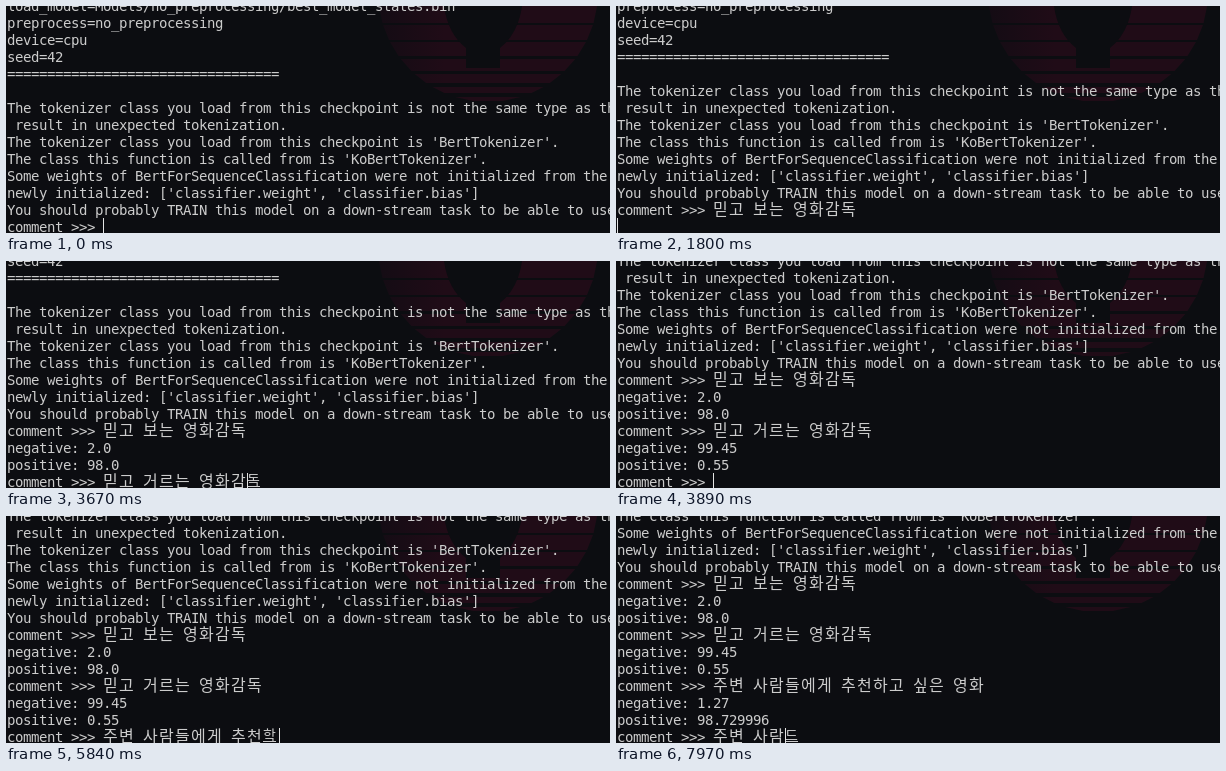
Animation, 604 px wide and 227 px high, one loop 8 s. Source, as an HTML page:

```html
<!DOCTYPE html>
<html lang="ko">
<head>
<meta charset="utf-8">
<title>Terminal session</title>
<style>
  html, body { margin: 0; width: 100%; height: 100%; overflow: hidden; background: #0c0d11; }
  svg { display: block; }
  text { font: 14px "DejaVu Sans Mono", "Noto Sans CJK KR", "Noto Sans CJK", monospace; fill: #cccccc; white-space: pre; }
  .wide { font: 16px "Noto Sans CJK KR", "Noto Sans CJK", sans-serif; }
  #preedit { font: 14px "Noto Sans CJK KR", "Noto Sans CJK", sans-serif; }
</style>
</head>
<body>
<svg width="604" height="227" viewBox="0 0 604 227">
  <defs>
    <linearGradient id="glow">
      <stop offset="0" stop-color="#140c14"/>
      <stop offset=".3" stop-color="#200c17"/>
      <stop offset="1" stop-color="#200c17"/>
    </linearGradient>
  </defs>
  <rect width="604" height="227" fill="#0c0d11"/>
  <path id="sun" fill="url(#glow)"/>
  <path d="M438 0h78q-4 28-22 42v20h-34v-20q-18-14-22-42z" fill="#0c0d11"/>
  <g id="rows"></g>
  <text id="preedit" y="224"></text>
  <rect id="underline" y="225" width="13" height="1" fill="#cccccc"/>
  <rect id="caret" y="212" width="1" height="15" fill="#e4e4e4"/>
</svg>
<script>
const LOOP = 8000, CELL = 8, LINE = 17, LEFT = 1, BASE = 226;
const PROMPT = 'comment >>> ';
const $ = id => document.getElementById(id);
const svgNode = (name, parent, attrs = {}) => {
  const node = document.createElementNS('http://www.w3.org/2000/svg', name);
  for (const key in attrs) node.setAttribute(key, attrs[key]);
  return parent.appendChild(node);
};

// Striped half sun behind the text
const SUN = { x: 482, y: -14, r: 110 };
const half = y => Math.sqrt(Math.max(0, SUN.r ** 2 - (y - SUN.y) ** 2));
$('sun').setAttribute('d', [[0, 17], [19, 15], [36, 14], [53, 12], [68, 9], [81, 6], [91, 4]].map(([y, h]) => {
  const a = half(y), b = half(y + h);
  return `M${SUN.x - a} ${y}H${SUN.x + a}L${SUN.x + b} ${y + h}H${SUN.x - b}Z`;
}).join(''));

// Hangul input: every key press gives one composing state
const LEADS = 'ㄱㄲㄴㄷㄸㄹㅁㅂㅃㅅㅆㅇㅈㅉㅊㅋㅌㅍㅎ';
const TAILS = ' ㄱㄲㄳㄴㄵㄶㄷㄹㄺㄻㄼㄽㄾㄿㅀㅁㅂㅄㅅㅆㅇㅈㅊㅋㅌㅍㅎ';
const syllable = (l, v, t) => String.fromCharCode(0xac00 + (l * 21 + v) * 28 + t);
const split = ch => {
  const n = ch.charCodeAt(0) - 0xac00;
  return [Math.floor(n / 588), Math.floor(n / 28) % 21, n % 28];
};

function keyStates(sentence, caretAfter = false) {
  const states = [];
  let done = '';
  const add = (text, composing = true) => states.push({ text, composing, caretAfter });
  for (const ch of sentence) {
    if (ch === ' ') {
      add(done += ch, false);
      continue;
    }
    const [l, v, t] = split(ch), last = done.slice(-1);
    const [pl, pv, pt] = last && last !== ' ' ? split(last) : [0, 0, -1];
    const lead = LEADS[l];
    if (pt === 0) add(done.slice(0, -1) + syllable(pl, pv, TAILS.indexOf(lead)));
    else if (pt === 4 && lead === 'ㅎ') add(done.slice(0, -1) + syllable(pl, pv, 6));
    else add(done + lead);
    if (v === 9) add(done + syllable(l, 8, 0));
    add(done + syllable(l, v, 0));
    if (t) add(done + syllable(l, v, t));
    done += ch;
  }
  return states;
}

const log = [
  'load_model=Models/no_preprocessing/best_model_states.bin',
  'preprocess=no_preprocessing',
  'device=cpu',
  'seed=42',
  '='.repeat(34),
  '',
  'The tokenizer class you load from this checkpoint is not the same type as the',
  ' result in unexpected tokenization.',
  "The tokenizer class you load from this checkpoint is 'BertTokenizer'.",
  "The class this function is called from is 'KoBertTokenizer'.",
  'Some weights of BertForSequenceClassification were not initialized from the m',
  "newly initialized: ['classifier.weight', 'classifier.bias']",
  'You should probably TRAIN this model on a down-stream task to be able to use '
];

// One entry per visible step
const steps = [];
const show = (rows, caret, preedit) => steps.push({ rows, caret, preedit });
const width = text => [...text].reduce((n, ch) => n + (ch > '\u1100' ? 2 : 1), 0);

function typeKeys(states) {
  for (const { text, composing, caretAfter } of states) {
    const fixed = PROMPT + (composing ? text.slice(0, -1) : text);
    const col = width(fixed);
    show([...log, fixed],
      caretAfter ? width(PROMPT + text) : col,
      composing ? { ch: text.slice(-1), col } : null);
  }
}

function enter(sentence, negative, positive, slow) {
  log.push(PROMPT + sentence);
  show([...log], 0);
  show([...log, ''], 0);
  log.push('negative: ' + negative, 'positive: ' + positive);
  if (slow) show([...log, ''], 0);
  show([...log, PROMPT], PROMPT.length);
}

const first = '믿고 보는 영화감독', second = '믿고 거르는 영화감독';
const third = '주변 사람들에게 추천하고 싶은 영화';
show([...log, PROMPT], PROMPT.length);
typeKeys(keyStates(first));
enter(first, '2.0', '98.0');
typeKeys(keyStates(second));
enter(second, '99.45', '0.55');
// One syllable settles before the next key; two late presses merge
const keys = keyStates(third, true);
keys.splice(40, 1);
keys.splice(26, 0, { ...keys[25], composing: false });
typeKeys(keys);
enter(third, '1.27', '98.729996', true);
typeKeys(keyStates('주변 사람드'));

// First and last step time of each run of twelve
const runs = [[70, 840], [910, 1660], [1730, 2490], [2560, 3320], [3390, 4170],
  [4240, 5010], [5080, 5840], [5900, 6660], [6730, 7490], [7560, 7970]];
const times = [0];
runs.forEach(([from, to], i) => {
  const gaps = i === runs.length - 1 ? 6 : 11;
  for (let k = 0; k <= gaps; k++) times.push(from + Math.round((to - from) * k / gaps / 10) * 10);
});

function setCells(node, text) {
  let col = 0;
  node.replaceChildren();
  for (const part of text.match(/[가-힣]+|[^가-힣]+/g) || []) {
    const xs = [...part].map(ch => {
      const x = LEFT + col * CELL;
      col += width(ch);
      return x;
    });
    const attrs = { x: xs.join(' ') };
    if (part[0] > '\u1100') attrs.class = 'wide';
    svgNode('tspan', node, attrs).textContent = part;
  }
}

const lines = Array.from({ length: 14 }, (_, i) =>
  svgNode('text', $('rows'), { y: BASE - (13 - i) * LINE }));
let shown = -1;

function draw(ms) {
  let index = times.length - 1;
  while (times[index] > ms) index--;
  if (index === shown) return;
  shown = index;
  const { rows, caret, preedit } = steps[index];
  const visible = rows.slice(-lines.length);
  lines.forEach((node, i) => setCells(node, visible[i]));
  $('preedit').textContent = preedit ? preedit.ch : '';
  $('underline').setAttribute('visibility', preedit ? 'visible' : 'hidden');
  if (preedit) {
    const x = LEFT + preedit.col * CELL;
    $('preedit').setAttribute('x', x);
    $('underline').setAttribute('x', x);
  }
  $('caret').setAttribute('x', LEFT + caret * CELL);
}

const begin = performance.now();
function tick() {
  draw((performance.now() - begin) % LOOP);
  requestAnimationFrame(tick);
}
draw(0);
requestAnimationFrame(tick);
</script>
</body>
</html>
```
